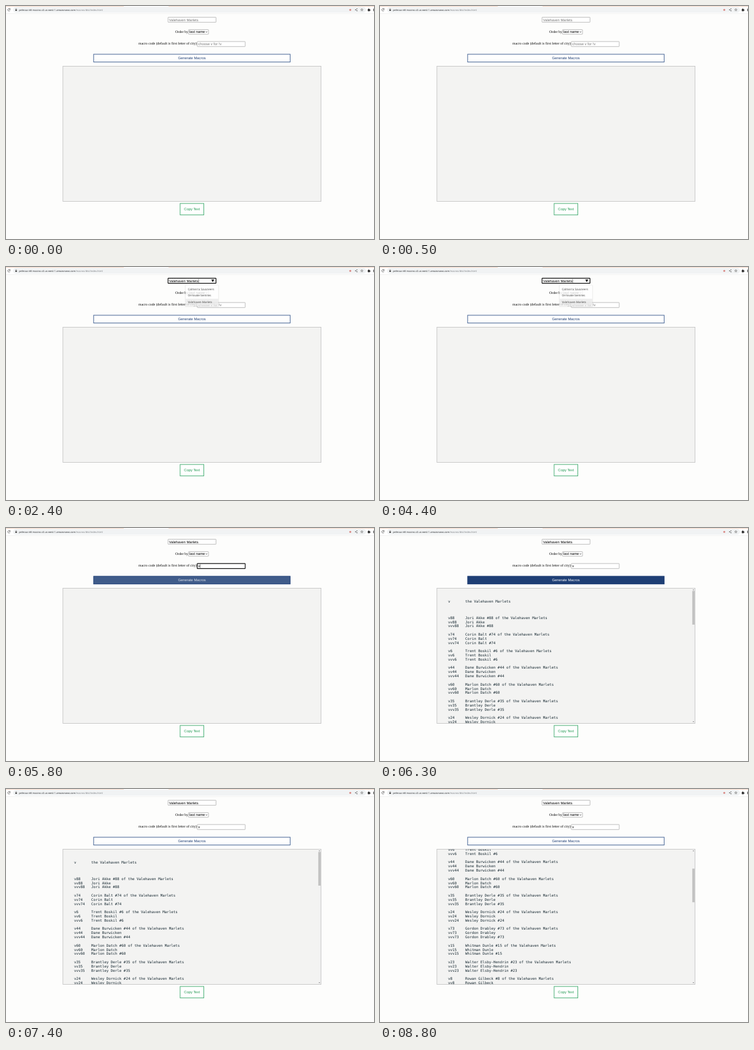
Animation, 600 px wide and 381 px high, one loop 9.4 s. Source, as an HTML page:

```html
<!DOCTYPE html>
<html lang="en">
<head>
<meta charset="utf-8">
<title>Macro generator</title>
<style>
  html, body { margin: 0; width: 100%; height: 100%; overflow: hidden; background: #fdfdfc; }
  svg { display: block; width: 100vw; height: 100vh; }
  text { font-size: 5.857px; white-space: pre; text-rendering: geometricPrecision; }
  .sans { font-family: "Liberation Sans", Arial, sans-serif; }
  .serif { font-family: "Liberation Serif", "Times New Roman", serif; }
  .mono { font-family: "DejaVu Sans Mono", monospace; fill: #14262f; }
  .ui { font-family: "Noto Sans", "Open Sans", sans-serif; }
</style>
</head>
<body>
<svg id="stage" viewBox="0 0 600 381">
  <defs>
    <clipPath id="area"><rect x="93" y="98.6" width="420" height="220.4"/></clipPath>
  </defs>
  <rect width="600" height="381" fill="#fdfdfc"/>
</svg>
<script>
const LOOP = 9400, LINE = 6.81, ROW = 10.5;
const TEAM = "Valehaven Marlets", CODE = "v";
const TEAMS = ("Aldmerin Kestrels,Arbolt Tanagers,Brunmarch Otters,Bryndale Drummers," +
  "Calmerra Savaneers,Carnwick Pipers,Columbrae Bluerunners,Corlinth Herons,Darnholt Anglers," +
  "Eskmoor Lanterns,Fennbury Millers,Garrowby Stoats,Halmister Foundry,Inchmarl Badgers," +
  "Jorrendale Flint,Kelbrand Coopers,Lindmarch Sparks,Mossgarth Rams,Norbeck Sailmakers," +
  "Orrisvale Sentries,Ostermill Bison,Pellgate Weasels,Quarnby Minnows,Rathmoor Ferrymen," +
  "Selbrook Thistles,Stannmere Colliers,Tarnfell Ospreys,Thornmarsh Elks,Ulmstead Quarry," +
  "Valehaven Marlets,Vostrel Ember Hounds,Wexmarch Gannets").split(",");
const PLAYERS = [
  [88, "Jori Akke"], [74, "Corin Balt"], [6, "Trent Boskil"], [44, "Dane Burwicken"],
  [60, "Marlon Datch"], [35, "Brantley Derle"], [24, "Wesley Dornick"], [73, "Gordon Drabley"],
  [15, "Whitman Dunle"], [23, "Walter Elsby-Hendrin"], [8, "Rowan Gilbeck"]
];

const stage = document.getElementById("stage");

function set(node, attrs) {
  for (const key in attrs) node.setAttribute(key, attrs[key]);
  return node;
}
function add(tag, attrs, parent = stage) {
  const node = document.createElementNS("http://www.w3.org/2000/svg", tag);
  return parent.appendChild(set(node, attrs));
}
const box = (x, y, width, height, attrs, parent) => add("rect", { x, y, width, height, ...attrs }, parent);
const path = (d, attrs, parent) => add("path", { d, fill: "none", ...attrs }, parent);
function label(str, x, y, cls, attrs, parent) {
  const node = add("text", { x, y, class: cls, ...attrs }, parent);
  node.textContent = str;
  return node;
}
const show = (node, on) => node.setAttribute("visibility", on ? "visible" : "hidden");
const mix = (a, b, p) => "rgb(" + a.map((v, i) => Math.round(v + (b[i] - v) * p)) + ")";

function drawBrowser() {
  box(0, 0, 600, 12.5, { fill: "#fff" });
  box(0, 0, 600, 1.1, { fill: "#f6d9c8" });
  box(192, 0, 73, 1.1, { fill: "#fff" });
  box(11.5, 1.6, 575.5, 9.4, { rx: 4.7, fill: "#f1f3f4" });
  box(0, 12.2, 600, 0.5, { fill: "#e3e4e5" });
  path("M6.4 5.2A1.9 1.9 0 1 0 6.6 6.9M6.8 3.9V5.5H5.2", { stroke: "#444", "stroke-width": 0.7 });
  box(15.1, 5.8, 2.8, 2.3, { rx: 0.3, fill: "#555" });
  path("M15.7 5.9V5.1A.8 .8 0 0 1 17.3 5.1V5.9", { stroke: "#555", "stroke-width": 0.5 });
  const small = { style: "font-size:3.94px" };
  const url = label("", 21.2, 7.7, "ui", small);
  [["pelmoa-nhl-macros.s3.us-west-1.amazonaws.com", "#2b2d30"], ["/macros/dist/index.html", "#7a7d81"]]
    .forEach(([part, fill]) => { add("tspan", { fill }, url).textContent = part; });
  add("circle", { cx: 561.3, cy: 6.3, r: 1.6, fill: "#d98a86" });
  path("M572.3 4.6L569.8 6.2L572.3 7.8", { stroke: "#666", "stroke-width": 0.5 });
  [[572.3, 4.6], [569.8, 6.2], [572.3, 7.8]].forEach(([cx, cy]) =>
    add("circle", { cx, cy, r: 0.7, fill: "#555" }));
  let star = "";
  for (let i = 0; i < 10; i++) {
    const r = i % 2 ? 0.9 : 2.2, a = i * Math.PI / 5;
    star += (i ? "L" : "M") + (580.2 + r * Math.sin(a)).toFixed(2) + " " + (6.3 - r * Math.cos(a)).toFixed(2);
  }
  path(star + "Z", { stroke: "#555", "stroke-width": 0.5 });
  box(589.8, 4.9, 3.6, 3.6, { rx: 0.4, fill: "#333" });
  add("circle", { cx: 591.5, cy: 4.8, r: 0.8, fill: "#333" });
  add("circle", { cx: 593.6, cy: 6.7, r: 0.8, fill: "#333" });
  box(598.8, 4.4, 1.2, 4, { fill: "#555" });
}

function field(x, y, hint) {
  const frame = box(x, y, 78.2, 8.2, { rx: 0.6, fill: "#fff" });
  const text = label("", x + 1.5, y + 6.1, "sans");
  const caret = box(0, y + 1.3, 0.5, 5.8, { fill: "#000" });
  return (value, focus) => {
    set(frame, { stroke: focus ? "#101010" : "#a2a2a2", "stroke-width": focus ? 1.2 : 0.7 });
    text.textContent = value || hint;
    text.setAttribute("fill", value ? "#000" : "#757575");
    show(caret, focus);
    caret.setAttribute("x", x + 1.7 + (value ? text.getComputedTextLength() : 0));
  };
}

drawBrowser();
const teamField = field(264.2, 18.4, TEAM);
label("Order by", 276, 44, "serif");
box(297.5, 38.6, 32.7, 7.6, { rx: 0.7, fill: "#fdfdfd", stroke: "#a2a2a2", "stroke-width": 0.7 });
label("last name", 299, 44.3, "sans");
path("M325.4 41.7L326.8 43.1L328.2 41.7", { stroke: "#222", "stroke-width": 0.7 });
label("macro code (default is first letter of city)", 216.1, 63.3, "serif");
const codeField = field(311.8, 58.1, "choose v for !v");

const button = box(142.9, 78.9, 320.4, 12.7, { stroke: "#446394", "stroke-width": 1 });
const buttonText = label("Generate Macros", 303, 87.1, "sans", { "text-anchor": "middle" });

box(92.8, 98.4, 420.9, 221, { fill: "#f3f3f2", stroke: "#bdbdbd", "stroke-width": 0.8 });
box(283.9, 322.9, 38.6, 18.7, { fill: "#fff", stroke: "#4bb077", "stroke-width": 1 });
label("Copy Text", 303.2, 334.1, "sans", { "text-anchor": "middle", fill: "#1f9850" });

// Generated macro list with its scrollbar
const results = add("g", { "clip-path": "url(#area)" });
const list = add("g", {}, results);
function macro(row, code, text) {
  const y = 121.5 + row * LINE;
  label(code, 110.9, y, "mono", {}, list);
  label(text, 139.1, y, "mono", {}, list);
}
macro(0, CODE, "the " + TEAM);
PLAYERS.forEach(([num, name], i) => {
  const row = 4 + i * 4;
  macro(row, CODE + num, `${name} #${num} of the ${TEAM}`);
  macro(row + 1, CODE + CODE + num, name);
  macro(row + 2, CODE + CODE + CODE + num, `${name} #${num}`);
});
box(508.6, 98.8, 4.7, 220.2, { fill: "#f2f2f2" }, results);
const thumb = box(509.2, 103, 3.7, 55, { fill: "#c1c1c1" }, results);
path("M509.9 101.6L511 100.2L512.1 101.6ZM509.9 316.2L511 317.6L512.1 316.2Z", { fill: "#555" }, results);

// Team suggestions
const arrow = path("M334.7 20.5H339.5L337.1 24.7Z", { fill: "#000" });
const menu = add("g");
const shades = [1.6, 0.8].map(grow => ({ grow, node: box(0, 0, 0, 0, { rx: 1.5, fill: "#000", opacity: 0.045 }, menu) }));
const sheet = box(293, 30, 0, 0, { rx: 1, fill: "#fff" }, menu);
const mark = box(293, 0, 0, ROW, { fill: "#ebebeb" }, menu);
const items = TEAMS.map(name => label(name, 296.4, 0, "ui", { style: "font-size:4.6px", fill: "#222" }, menu));

function drawMenu(query, marked) {
  let n = 0, longest = 0;
  TEAMS.forEach((name, i) => {
    const hit = name.toLowerCase().includes(query.toLowerCase());
    items[i].setAttribute("display", hit ? "inline" : "none");
    if (!hit) return;
    items[i].setAttribute("y", 37.7 + n * ROW);
    if (name === TEAM) mark.setAttribute("y", 30.9 + n * ROW);
    longest = Math.max(longest, name.length);
    n++;
  });
  const width = longest * 2.3 + 11.6, height = n * ROW + 2;
  set(sheet, { width, height });
  shades.forEach(({ grow, node }) => set(node, {
    x: 293 - grow, y: 30.6 - grow, width: width + 2 * grow, height: height + 2 * grow
  }));
  mark.setAttribute("width", width);
  mark.setAttribute("display", marked ? "inline" : "none");
}

const FADES = [
  [100, [0.1, 0.3, 0.2, 0.08, 0]],
  [5800, [0.85, 0.95, 0.99, 1]],
  [7000, [0.88, 0.6, 0.3, 0.1, 0]]
];
function hover(t) {
  let p = 0;
  for (const [start, steps] of FADES) {
    if (t >= start) p = steps[Math.min(steps.length - 1, Math.floor((t - start) / 100))];
  }
  return p;
}

function render(t) {
  const query = t < 1000 ? "" : t < 1300 ? "V" : "Va";
  const open = t >= 700 && t < 5800;
  teamField(t < 1900 ? query : TEAM, open);
  codeField(t < 5800 ? "" : CODE, t >= 5800 && t < 6100);

  menu.setAttribute("display", open ? "inline" : "none");
  show(arrow, open);
  if (open) {
    drawMenu(query, t >= 1700);
    menu.setAttribute("opacity", t < 800 ? 0.6 : t < 1900 ? 1 : 0.8);
  }

  const p = hover(t), navy = [31, 63, 117], white = [254, 254, 254];
  button.setAttribute("fill", mix(white, navy, p));
  button.setAttribute("stroke", mix([68, 99, 148], navy, p));
  buttonText.setAttribute("fill", mix(navy, white, p));

  const down = t >= 8800;
  results.setAttribute("display", t >= 6300 ? "inline" : "none");
  list.setAttribute("transform", `translate(0 ${down ? -16 * LINE : 0})`);
  thumb.setAttribute("y", down ? 130.2 : 103);
}

const start = performance.now();
function tick() {
  render((performance.now() - start) % LOOP);
  requestAnimationFrame(tick);
}
tick();
</script>
</body>
</html>
```
